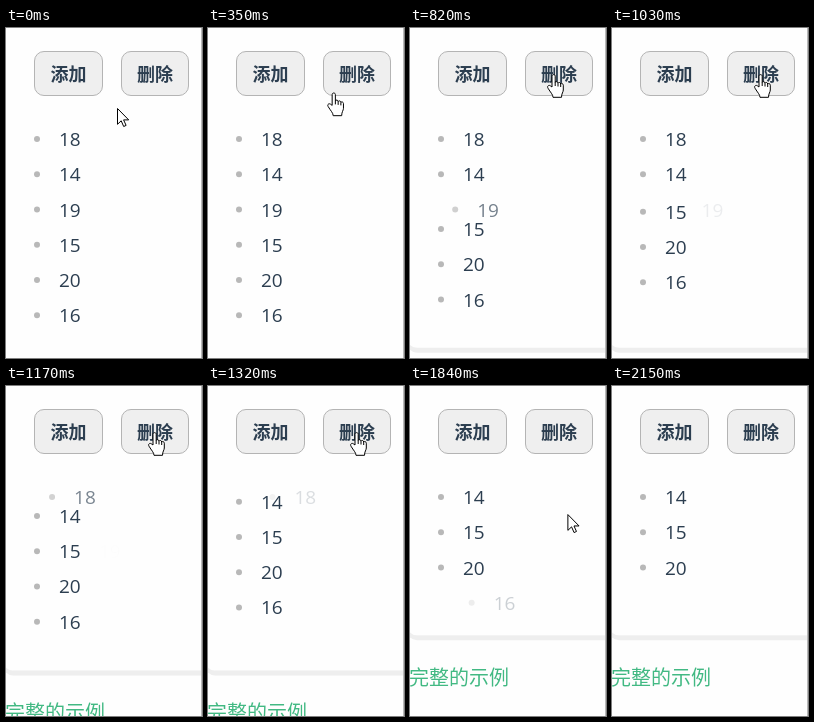
These frames come from a looping animation (196 px wide and 330 px high, 2.36 s). An HTML page:

```html
<!DOCTYPE html>
<html lang="zh">
<head>
<meta charset="utf-8">
<style>
html, body { margin: 0; width: 100%; height: 100%; overflow: hidden; background: #fefefe; }
svg { display: block; width: 196px; height: 330px; }
.button { fill: #efefef; stroke: #b4b4b4; }
.label { font: bold 18px "Noto Sans CJK SC", "Noto Sans CJK", sans-serif; fill: #2c3e50; text-anchor: middle; }
.number { font: 19px "Open Sans", "Noto Sans", sans-serif; fill: #2c3e50; }
.heading { font: 20px "Noto Sans CJK SC", "Noto Sans CJK", sans-serif; fill: #42b983; }
.cursor { fill: #fff; stroke: #000; stroke-linejoin: round; }
</style>
</head>
<body>
<svg id="stage" viewBox="0 0 196 330">
  <defs><filter id="soft"><feGaussianBlur stdDeviation="0.7"/></filter></defs>
  <rect width="196" height="330" fill="#fefefe"/>
  <g id="panel">
    <rect x="-3" y="-400" width="230" height="405" rx="10" fill="#eeeeee" filter="url(#soft)"/>
    <rect x="-3" y="-400" width="230" height="400" rx="10" fill="#fefefe"/>
    <text class="heading" x="-1" y="49.5">完整的示例</text>
  </g>
  <path d="M195.5 0V330" stroke="#b9b9b9"/>
  <rect class="button" x="28.5" y="23.5" width="68" height="44" rx="9.5"/>
  <rect class="button" x="115.5" y="23.5" width="67" height="44" rx="9.5"/>
  <text class="label" x="62.5" y="52.5">添加</text>
  <text class="label" x="149" y="52.5">删除</text>
  <g id="list"></g>
  <path id="arrow" class="cursor" d="M.5 .5V16.3L4.2 12.8 6.7 18.5 9.1 17.4 6.6 11.9H11.7Z"/>
  <g id="hand" class="cursor">
    <path d="M5 13V2.2C5 .1 8.2 .1 8.2 2.2V8.6C8.6 7.2 11 7.4 11 9.2 11.5 8 13.6 8.3 13.7 10 14.4 9 16.3 9.6 16.3 11.2V16C16.3 18 14.5 19.5 14.5 23.3H6C6 20.5 3.5 18.5 1 14.2-.4 11.8 2.3 10.6 3.6 12Z"/>
    <path d="M8.2 8.6V12M11 9.2V12.5M13.7 10V13" fill="none"/>
  </g>
</svg>
<script>
const LOOP = 2360, ROW = 35.25, DURATION = 500, SLIDE = 40;
const MOVE_LEAD = 12, LEAVE_DELAY = 8;
const removals = [{ index: 2, at: 700 }, { index: 0, at: 1045 }, { index: 5, at: 1600 }];
const path = [
  { t: 150, x: 111, y: 80 }, { t: 580, x: 143.5, y: 46.5 },
  { t: 870, x: 143.5, y: 46.5 }, { t: 1000, x: 148.5, y: 46.5 },
  { t: 1680, x: 148.5, y: 46.5 }, { t: 2140, x: 180, y: 336 }
];
const $ = id => document.getElementById(id);
const clamp = v => Math.min(1, Math.max(0, v));
const smooth = p => p * p * (3 - 2 * p);

const items = [18, 14, 19, 15, 20, 16].map(value => {
  const g = document.createElementNS("http://www.w3.org/2000/svg", "g");
  g.innerHTML = `<circle cx="31" cy="0" r="3" fill="#b8b8b8"/><text class="number" x="53" y="7">${value}</text>`;
  $("list").append(g);
  return g;
});

// cubic-bezier(.25, .1, .25, 1)
function ease(x) {
  if (x <= 0 || x >= 1) return clamp(x);
  const curve = (a, b, s) => 3 * a * s * (1 - s) ** 2 + 3 * b * s * s * (1 - s) + s ** 3;
  let low = 0, high = 1;
  for (let i = 0; i < 20; i++) {
    const mid = (low + high) / 2;
    if (curve(.25, .25, mid) < x) low = mid; else high = mid;
  }
  return curve(.1, 1, low);
}

function pointer(t) {
  const next = path.findIndex(p => p.t > t);
  if (next <= 0) return next ? path[path.length - 1] : path[0];
  const a = path[next - 1], b = path[next];
  const p = smooth((t - a.t) / (b.t - a.t));
  return { x: a.x + (b.x - a.x) * p, y: a.y + (b.y - a.y) * p };
}

function place(node, x, y) {
  node.setAttribute("transform", `translate(${x} ${y})`);
}

function render(t) {
  const done = removals.filter(r => t >= r.at);
  place($("panel"), 0, 355 - ROW * done.length);

  items.forEach((item, i) => {
    let row = i, leave = 0;
    for (const r of done) {
      if (r.index < i) row -= ease((t - r.at + MOVE_LEAD) / DURATION);
      if (r.index === i) leave = ease((t - r.at - LEAVE_DELAY) / DURATION);
    }
    place(item, SLIDE * leave, 111 + ROW * row);
    item.setAttribute("opacity", 1 - leave);
  });

  const { x, y } = pointer(t);
  const hovering = x >= 115 && x <= 183 && y >= 23 && y <= 68;
  $("hand").style.display = hovering ? "" : "none";
  $("arrow").style.display = hovering ? "none" : "";
  place($("hand"), x - 6.5, y - .5);
  place($("arrow"), x, y);
}

const start = performance.now();
function tick() {
  render((performance.now() - start) % LOOP);
  requestAnimationFrame(tick);
}
tick();
</script>
</body>
</html>
```
